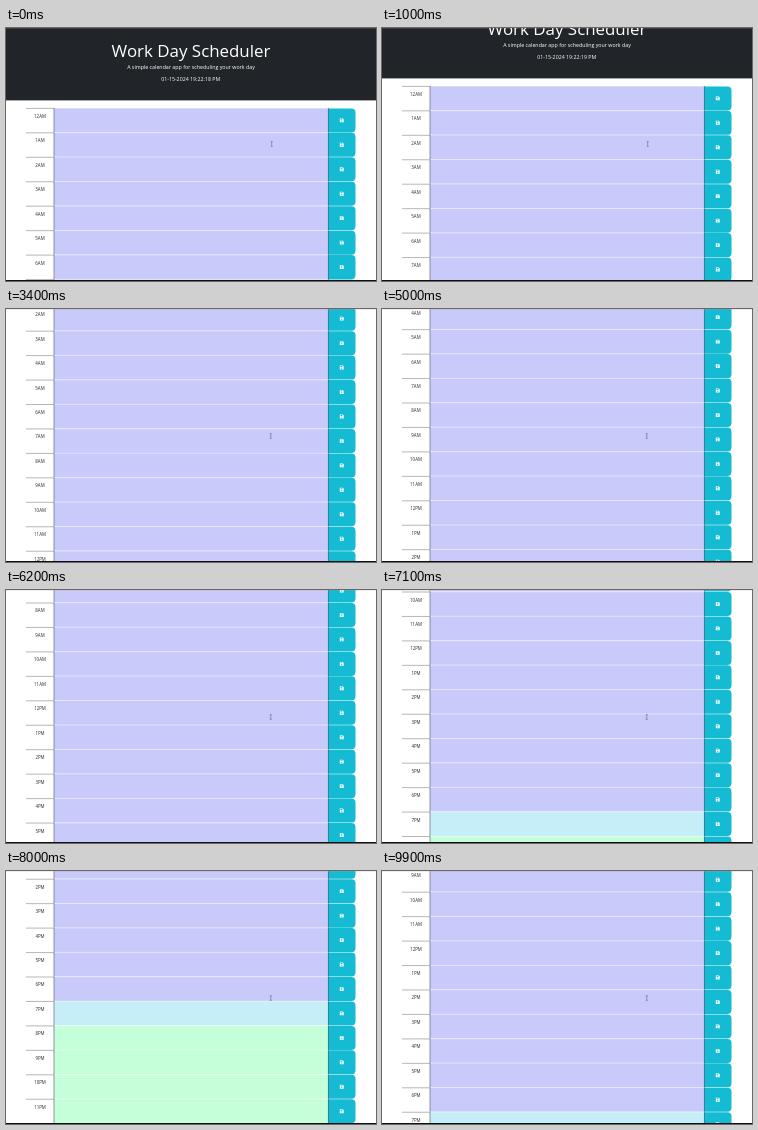
These frames come from a looping animation (370x253 px, 10 s). An HTML page:

```html
<!DOCTYPE html>
<html lang="en">
<head>
<meta charset="utf-8">
<title>Work Day Scheduler</title>
<style>
  html, body { margin: 0; width: 100%; height: 100%; overflow: hidden; background: #fff; }
  svg { display: block; width: 370px; height: 253px; font-family: "Open Sans", "Noto Sans", sans-serif; }
  text { text-anchor: middle; }
  .head text { fill: #fff; }
  .hour { font-size: 4.4px; fill: #212529; }
</style>
</head>
<body>
<svg viewBox="0 0 370 253">
  <g id="page">
    <g class="head">
      <rect y="-1" width="370" height="73.4" fill="#212529"/>
      <text x="185" y="29" font-size="16.9">Work Day Scheduler</text>
      <text x="185" y="41.2" font-size="5.3">A simple calendar app for scheduling your work day</text>
      <text x="184.7" y="53.3" font-size="5.27" id="clock"></text>
    </g>
    <g id="rows"></g>
  </g>
  <rect width="370" height="1" fill="#c88c96" opacity=".2"/>
  <rect y="252" width="370" height="1" fill="#101112"/>
  <path id="cursor" d="M-1 -2.3H1M0 -2.3V2.3M-1 2.3H1" fill="none" stroke="#666884" stroke-width=".6"/>
</svg>
<script>
const $ = id => document.getElementById(id);
const LOOP = 10000, STEP = 100, TOP = 80, PITCH = 24.45, NOW = 19;

function row(h) {
  const fill = h < NOW ? '#c8cbfa' : h === NOW ? '#c6eef9' : '#c4ffd9';
  const label = (h % 12 || 12) + (h < 12 ? 'AM' : 'PM');
  return `<g transform="translate(0 ${TOP + h * PITCH})">
    <path d="M20 .4H48" stroke="#999" stroke-width=".7"/>
    <text class="hour" x="34" y="9.9">${label}</text>
    <rect x="48" width="274.5" height="${PITCH}" fill="${fill}"/>
    <path d="M48 .2H322" stroke="#fff" stroke-width=".7" opacity=".6"/>
    <path d="M322 .4H345.3Q349.5 .4 349.5 4.6V20.2Q349.5 24.4 345.3 24.4H322Z" fill="#14bbd2"/>
    <path d="M48 0V${PITCH}M322.4 0V${PITCH}" stroke="#505269" stroke-width=".6"/>
    <path d="M333.8 10.4H336.8L337.7 11.3V14.3H333.8Z" fill="#fff"/>
    <path d="M334.6 10.9H336.4V11.8H334.6ZM335.2 12.6H336.3V13.6H335.2Z" fill="#14bbd2"/>
  </g>`;
}
$('rows').innerHTML = Array.from({ length: 24 }, (_, h) => row(h)).join('');

// Wheel gestures: first step, last step, resting offset
const gestures = [
  [100, 300, 1], [700, 700, 22], [1200, 1300, 52.6],
  [2200, 2400, 66], [2600, 2700, 100], [3300, 3400, 131.6],
  [4000, 4300, 158], [4700, 4800, 182], [5300, 6200, 263],
  [6800, 7400, 367.8], [7500, 7800, 414.5], [9800, 9900, 303.7]
];

// Each gesture advances in equal steps to its resting offset
function scrollAt(t) {
  const tick = Math.floor(t / STEP) * STEP;
  return gestures.reduce((y, [first, last, rest]) => {
    const p = (tick - first + STEP) / (last - first + STEP);
    return y + (rest - y) * Math.min(1, Math.max(0, p));
  }, 0);
}

function draw(t) {
  $('page').setAttribute('transform', `translate(0 ${-scrollAt(t)})`);
  $('clock').textContent = `01-15-2024 19:22:${18 + Math.floor(t / 1000)} PM`;
  $('cursor').setAttribute('transform', t < 2600 ? 'translate(265.7 116)' : 'translate(264.8 127)');
}

function frame() {
  draw((performance.now() - begin) % LOOP);
  requestAnimationFrame(frame);
}
const begin = performance.now();
frame();
</script>
</body>
</html>
```
